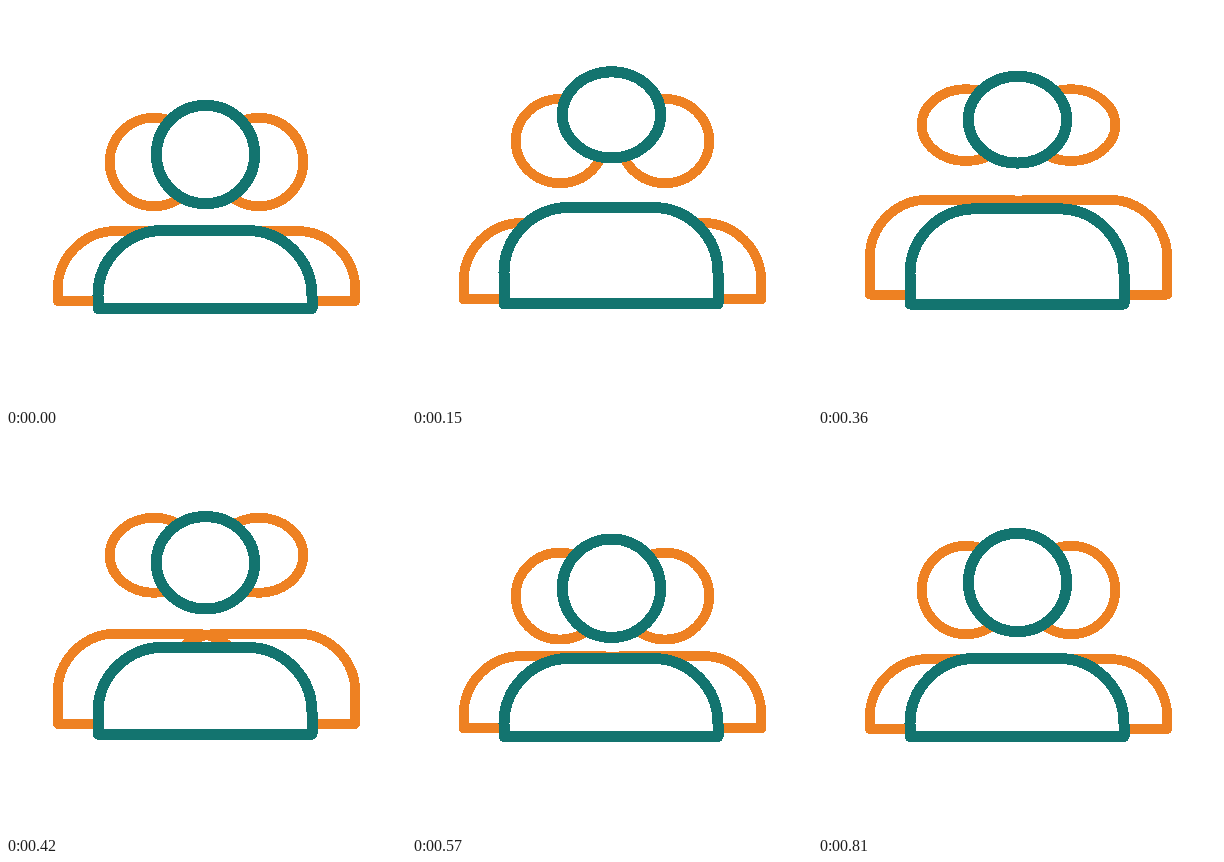
Recreate the animation shown at these times as an HTML page. Size 400x400 px, loop 1370 ms.

```html
<!DOCTYPE html>
<html lang="en">
<head>
<meta charset="utf-8">
<title>Group icon</title>
<style>
  html, body { margin: 0; width: 100%; height: 100%; overflow: hidden; background: #fff; }
  svg { display: block; width: 100%; height: 100%; }
  g { stroke-linejoin: round; shape-rendering: crispEdges; }
  .back { fill: none; stroke: #ee8122; stroke-width: 9.8; }
  .front { fill: #fff; stroke: #13746f; stroke-width: 11; }
</style>
</head>
<body>
<svg viewBox="0 0 400 400">
  <g class="back">
    <path id="bodyL"/><path id="bodyR"/>
    <ellipse id="headL" cx="148" rx="44.3"/><ellipse id="headR" cx="253" rx="44.3"/>
  </g>
  <g class="front">
    <path id="body"/>
    <ellipse id="head" cx="199.5" rx="49.2"/>
  </g>
</svg>
<script>
const LOOP = 1370, STEP = 30, DELAY = 95;
const PEAK = 240, LAND = 480, SETTLE = 720, BODY_END = 530;
const $ = id => document.getElementById(id);
const span = (t, a, b) => Math.min(1, Math.max(0, (t - a) / (b - a)));
const smooth = u => u * u * (3 - 2 * u);

// 0 at rest, 1 fully stretched
function stretch(t) {
  return t < PEAK
    ? 1 - (1 - span(t, 0, PEAK)) ** 1.12
    : 1 - smooth(span(t, PEAK, BODY_END));
}

// Height of the jump, dipping below rest on landing
function lift(t, height, dip) {
  if (t < PEAK) return height * (1 - (1 - span(t, 0, PEAK)) ** 3.2);
  if (t < LAND) return height - (height + dip) * span(t, PEAK, LAND) ** 2.9;
  return -dip * (1 - smooth(span(t, LAND, SETTLE)));
}

function setHead(el, cy, ry) {
  el.setAttribute("cy", cy.toFixed(2));
  el.setAttribute("ry", ry.toFixed(2));
}

function setBody(el, left, right, top, bottom, r) {
  const arc = `A${r} ${r} 0 0 1`;
  el.setAttribute("d", `M${left} ${bottom}V${top + r}${arc} ${left + r} ${top}` +
    `H${right - r}${arc} ${right} ${top + r}V${bottom}Z`);
}

function draw(t) {
  const p = stretch(t), q = stretch(t - DELAY);
  setHead($("head"), 148.5 - lift(t, 41.5, 8.5), 49.2 - 9.3 * p);
  setBody($("body"), 92, 306, 224.5 - 34.5 * p, 302.5 - 7 * p, 65);

  const cy = 156 - lift(t - DELAY, 37, 8.8), ry = 44.3 - 8.5 * q;
  setHead($("headL"), cy, ry);
  setHead($("headR"), cy, ry);
  const top = 225 - 32 * q, bottom = 295 - 6.5 * q;
  setBody($("bodyL"), 51.7, 245.5, top, bottom, 58.5);
  setBody($("bodyR"), 155.5, 349.3, top, bottom, 58.5);
}

function tick() {
  const t = performance.now() % LOOP;
  draw(Math.floor(t / STEP) * STEP);
  requestAnimationFrame(tick);
}
draw(0);
requestAnimationFrame(tick);
</script>
</body>
</html>
```
